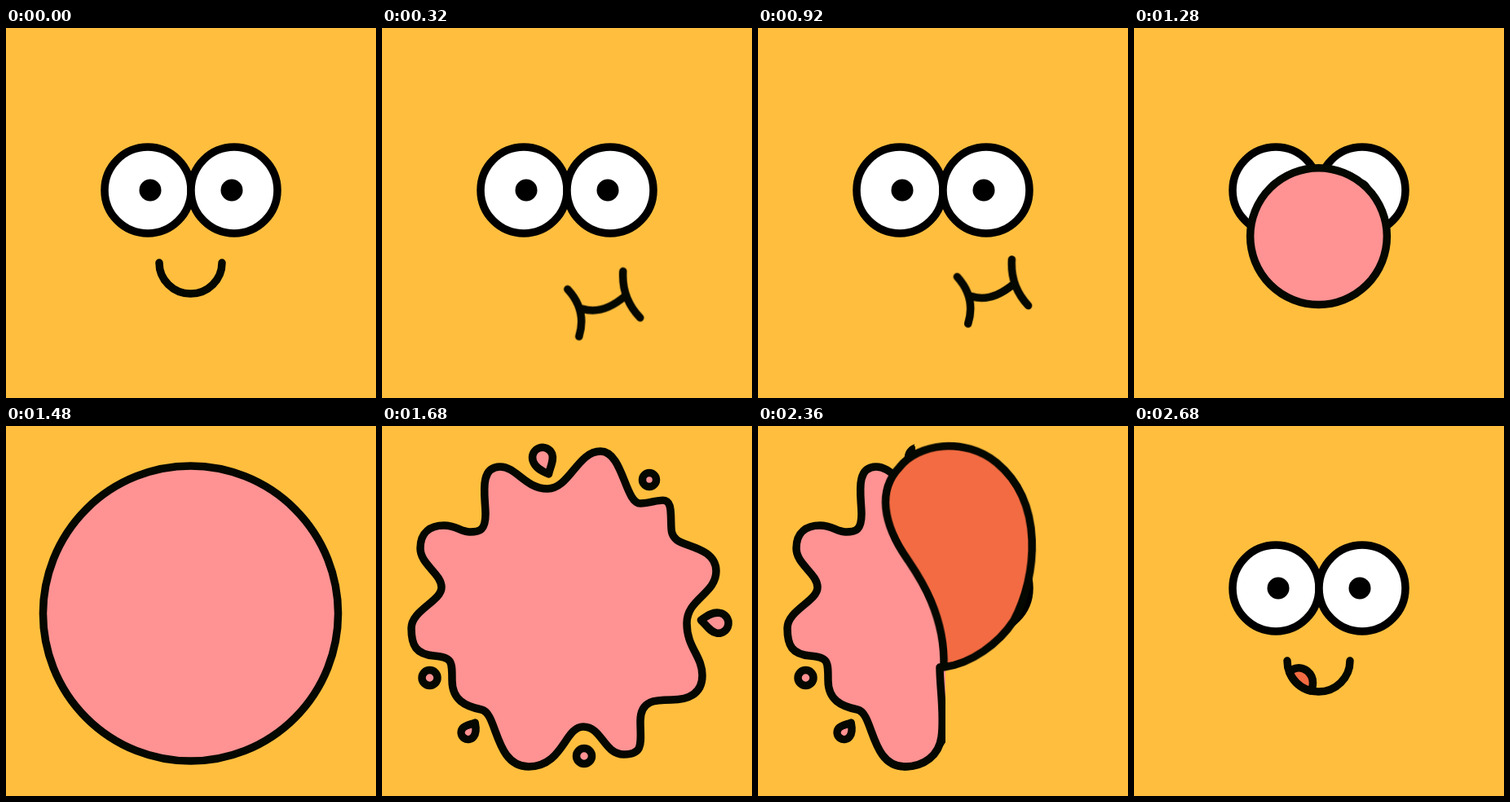
Animation of 454 by 454 pixels, one loop 2720 ms. Source, as an HTML page without scripts:

```html
<!DOCTYPE html>
<html lang="en">
<head>
<meta charset="utf-8">
<title>Bubble gum face</title>
<style>
/* direction of the tongue, 0 is straight up; it also drives the wiping of the gum */
@property --turn { syntax: "<angle>"; inherits: true; initial-value: 190deg; }

html, body { margin: 0; width: 100%; height: 100%; overflow: hidden; background: #ffbe3d; }
main { animation: turn 2.72s linear infinite; }
svg {
  position: absolute; left: 0; top: 0; width: 454px; height: 454px;
  stroke: #050800; stroke-width: 9.5; stroke-linecap: round; stroke-linejoin: round;
}
path, use { vector-effect: non-scaling-stroke; }
.line { fill: none; }
.gum { fill: #ff9292; }
.lick { fill: #f36b42; }
.eye { fill: #fff; stroke: #000; }
.pupil { fill: #000; stroke: none; }

/* one 2.72 s clock; every show-* animation is a hard switch */
#smile { animation: show-smile 2.72s step-end infinite; }
#mouth {
  offset-path: path("M225 309 C200 318 184 338 196 356 C216 386 262 350 289 322 C352 272 275 290 225 309Z");
  offset-rotate: 0deg;
  animation: show-mouth 2.72s step-end infinite, chew 2.72s linear infinite;
}
#lips { animation: pucker 2.72s ease-in-out infinite; }
#bubble {
  animation: show-bubble 2.72s step-end infinite,
    blow 2.72s cubic-bezier(.333, .43, .667, .85) infinite;
}
#splat {
  -webkit-mask-image: conic-gradient(from 180deg at 230px 296px, #000 calc(173deg + var(--turn)), #0000 0);
  mask-image: conic-gradient(from 180deg at 230px 296px, #000 calc(173deg + var(--turn)), #0000 0);
  animation: show-splat 2.72s step-end infinite;
}
#burst { transform-origin: 226px 228px; animation: burst 2.72s linear infinite; }
#cut { animation: show-cut 2.72s step-end infinite; }
#peek { stroke-width: 8; animation: show-peek 2.72s step-end infinite; }
#tongue {
  transform-origin: 228px 296px; rotate: var(--turn);
  animation: show-tongue 2.72s step-end infinite, stretch 2.72s linear infinite;
}
#tip {
  transform-origin: 208px 316px;
  animation: show-tip 2.72s step-end infinite, retract 2.72s linear infinite;
}

@keyframes show-smile { 0% { opacity: 1 } 1.47% { opacity: 0 } 92.64%, 100% { opacity: 1 } }
@keyframes show-mouth { 0% { opacity: 0 } 1.47% { opacity: 1 } 42.64%, 100% { opacity: 0 } }
@keyframes show-bubble { 0% { opacity: 0 } 42.64% { opacity: 1 } 58.82%, 100% { opacity: 0 } }
@keyframes show-splat { 0% { opacity: 0 } 58.82% { opacity: 1 } 94.11%, 100% { opacity: 0 } }
@keyframes show-cut { 0% { opacity: 0 } 80.88%, 100% { opacity: 1 } }
@keyframes show-peek { 0% { opacity: 0 } 79.41% { opacity: 1 } 80.88%, 100% { opacity: 0 } }
@keyframes show-tongue { 0% { opacity: 0 } 80.88% { opacity: 1 } 94.11%, 100% { opacity: 0 } }
@keyframes show-tip { 0% { opacity: 0 } 94.11%, 100% { opacity: 1 } }

/* two rounds of chewing */
@keyframes chew {
  0%, 1.47% { offset-distance: 0% }
  42.64%, 100% { offset-distance: 200% }
}
@keyframes pucker {
  0%, 1.47%, 22.05%, 42.64%, 100% { transform: rotate(10deg) scale(.62, .8) }
  11.76%, 32.35% { transform: rotate(0deg) scale(1, 1) }
}
@keyframes blow {
  0%, 42.64% { r: 10px; cy: 275px }
  57.35%, 100% { r: 204px; cy: 224px }
}
@keyframes burst {
  0%, 58.82% { transform: scale(.95) }
  61.76%, 100% { transform: none }
}
@keyframes turn {
  0% { --turn: 190deg; animation-timing-function: step-end }
  80.88% { --turn: 115deg }
  86.76% { --turn: 0deg }
  94.11%, 100% { --turn: -155deg }
}
@keyframes stretch {
  0%, 80.88% { scale: .4 }
  83.82%, 86.76% { scale: 1 }
  94.11%, 100% { scale: .25 }
}
@keyframes retract {
  0%, 94.11% { transform: scale(1.8) }
  98.52%, 100% { transform: none }
}
</style>
</head>
<body>
<main>
<svg viewBox="0 0 454 454">
  <circle class="eye" cx="174" cy="199" r="53"/>
  <circle class="eye" cx="280" cy="199" r="53"/>
  <circle class="pupil" cx="177" cy="199" r="13.5"/>
  <circle class="pupil" cx="277" cy="199" r="13.5"/>
  <g id="mouth">
    <path id="lips" class="line" d="M-45 -17 Q-21 9 -31 41 M-27 7 Q-2 15 26 -9 M23 -39 Q21 -6 44 18"/>
  </g>
  <circle id="bubble" class="gum" cx="226.5" cy="275" r="10"/>
</svg>

<svg id="splat" viewBox="0 0 454 454">
  <defs>
    <path id="drop" vector-effect="non-scaling-stroke"
      d="M0 20 C-8 13 -13 7 -13 -1 A12.5 12.5 0 0 1 12 -2 C12 6 5 12 0 20Z"/>
  </defs>
  <g id="burst" class="gum">
    <path d="M145 50 C165 50 176 77 203 77 S240 31 268 31 S298 95 317 95 S352 82 354 103
      S352 132 362 140 S410 150 410 178 S374 212 374 242 S393 282 393 306 S374 336 355 336
      S317 336 317 362 S322 403 297 403 S270 369 247 369 S222 418 180 418 S142 352 122 348
      S86 336 86 312 S86 284 64 282 S36 270 36 248 S73 215 73 198 S47 170 47 150
      S60 122 76 122 S96 130 108 130 S127 128 127 108 S118 50 145 50Z"/>
    <use href="#drop" transform="translate(198 40) rotate(-19)"/>
    <use href="#drop" transform="translate(411 242) rotate(101)"/>
    <use href="#drop" transform="translate(106 375) rotate(-143) scale(.68)"/>
    <circle cx="328" cy="66" r="8.5"/>
    <circle cx="58.5" cy="309" r="9.5"/>
    <circle cx="248" cy="405" r="9.5"/>
  </g>
  <path id="cut" class="gum" d="M223 296 C223 320 229 355 225 382 C222 404 204 418 180 418"/>
</svg>

<svg viewBox="0 0 454 454">
  <path id="tip" class="lick" d="M194 299 C207 292 222 303 219 320 L216 325 A38.5 38.5 0 0 1 191 303Z"/>
  <path id="smile" class="line" d="M188 288 a38.5 38 0 0 0 77 0"/>
  <path id="peek" class="lick" d="M227 295 C241 293 250 287 253 277 C263 285 258 303 243 303 C236 303 232 299 227 295Z"/>
  <path id="tongue" class="lick" d="M228 296 C231 230 198 182 185 162 C155 118 150 76 177 49
    C200 20 258 12 297 45 C355 95 345 185 315 240 C296 268 262 292 228 296Z"/>
</svg>
</main>
</body>
</html>
```
